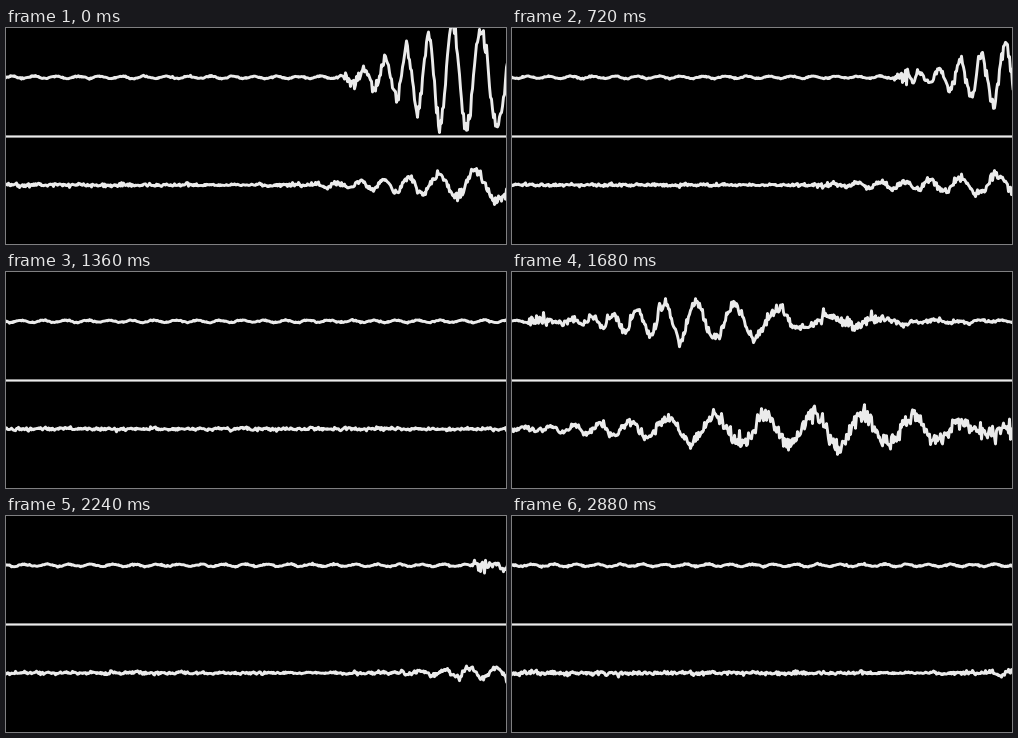
A matplotlib script that plays this animation: 500 px wide and 216 px high, repeating every 2960 ms.

```python
import numpy as np
import matplotlib.pyplot as plt
from matplotlib.animation import FuncAnimation

W, H, DPI = 500, 216, 100
FRAMES, INTERVAL = 37, 80
SPEED = 168                      # pixels scrolled per frame
LENGTH = FRAMES * SPEED          # the strip wraps after one loop
LEAD = 300                       # room kept before the onset of a burst
INK = "#ebebeb"


def bump(d, center, width):
    return np.exp(-((d - center) / width) ** 2)


class Trace:
    """A scrolling strip of chirped bursts with spiky noise."""

    def __init__(self, base, ripple, hiss, seed):
        x = np.arange(LENGTH)
        self.base = base
        self.wave = ripple * np.sin(2 * np.pi * 282 * x / LENGTH)
        self.noise = np.full(LENGTH, float(hiss))
        self.rng = np.random.default_rng(seed)

    def chirp(self, d, first, last):
        """Phase with a slowing period and a crest at both first and last."""
        p0, p1, start, span = self.period
        period = p0 + (p1 - p0) * np.clip((d - first - start) / span, 0, 1)
        cycles = np.cumsum(1 / period)
        cycles -= cycles[LEAD + first]
        total = cycles[LEAD + last]
        return 2 * np.pi * cycles * round(total) / total

    def burst(self, onset, gain, rise, hold, fade, last):
        d = np.arange(-LEAD, LENGTH - LEAD)
        env = gain * np.clip(d / rise, 0, 1) ** self.power
        env *= np.exp(-np.maximum(d - hold, 0) / fade)
        i = (onset + d) % LENGTH
        self.wave[i] += env * np.cos(self.chirp(d, self.first, last))
        self.noise[i] += self.grit(d, env, hold)

    def build(self):
        spikes = 0.48 * self.noise * self.rng.standard_normal(LENGTH)
        self.y = self.base - self.wave + spikes

    def window(self, offset):
        n = np.arange(-4, W + 5)
        return n + 0.5, self.y[(offset + n) % LENGTH]


class Upper(Trace):
    period, first, power = (21, 53, 60, 200), 17, 1.2

    def grit(self, d, env, hold):
        return (1.2 * np.sqrt(env) + 8 * bump(d, 5, 9)
                + 3 * bump(d, hold + 115, 35))


class Lower(Trace):
    period, first, power = (25, 50, 65, 110), 52, 1.5

    def grit(self, d, env, hold):
        build = np.clip(1.5 * d / hold, 0, 1)
        return (2 * np.sqrt(env) * build + 12 * bump(d, hold + 170, 65)
                + 0.8 * bump(d, 30, 60) - 0.9 * bump(d, -45, 40))


top = Upper(49.3, 1.1, 0.8, 4)
top.burst(340, gain=50, rise=100, hold=470, fade=55, last=580)
top.burst(1900, gain=40, rise=125, hold=270, fade=40, last=356)
top.burst(3549, gain=19, rise=145, hold=215, fade=65, last=349)
top.burst(5174, gain=24, rise=150, hold=280, fade=60, last=500)

low = Lower(157, 0.3, 1.6, 9)
low.burst(277, gain=20, rise=240, hold=640, fade=80, last=675)
low.burst(1804, gain=17, rise=270, hold=490, fade=80, last=482)
low.burst(3488, gain=15, rise=240, hold=430, fade=80, last=490)
low.burst(5065, gain=20, rise=270, hold=620, fade=90, last=700)

fig = plt.figure(figsize=(W / DPI, H / DPI), dpi=DPI, facecolor="black")
ax = fig.add_axes([0, 0, 1, 1])
ax.set_xlim(0, W)
ax.set_ylim(H, 0)
ax.axis("off")


def px(n):
    return n * 72 / DPI


ax.plot([-5, W + 5], [108.5, 108.5], color=INK, lw=px(2.2), snap=False)
lines = []
for trace in (top, low):
    trace.build()
    line, = ax.plot([], [], color=INK, lw=px(2.9), solid_joinstyle="round")
    lines.append((trace, line))


def draw(i):
    for trace, line in lines:
        line.set_data(*trace.window(i * SPEED))
    return [line for _, line in lines]


anim = FuncAnimation(fig, draw, frames=FRAMES, interval=INTERVAL,
                     init_func=lambda: draw(0), repeat=True, repeat_delay=0)
plt.show()
```
